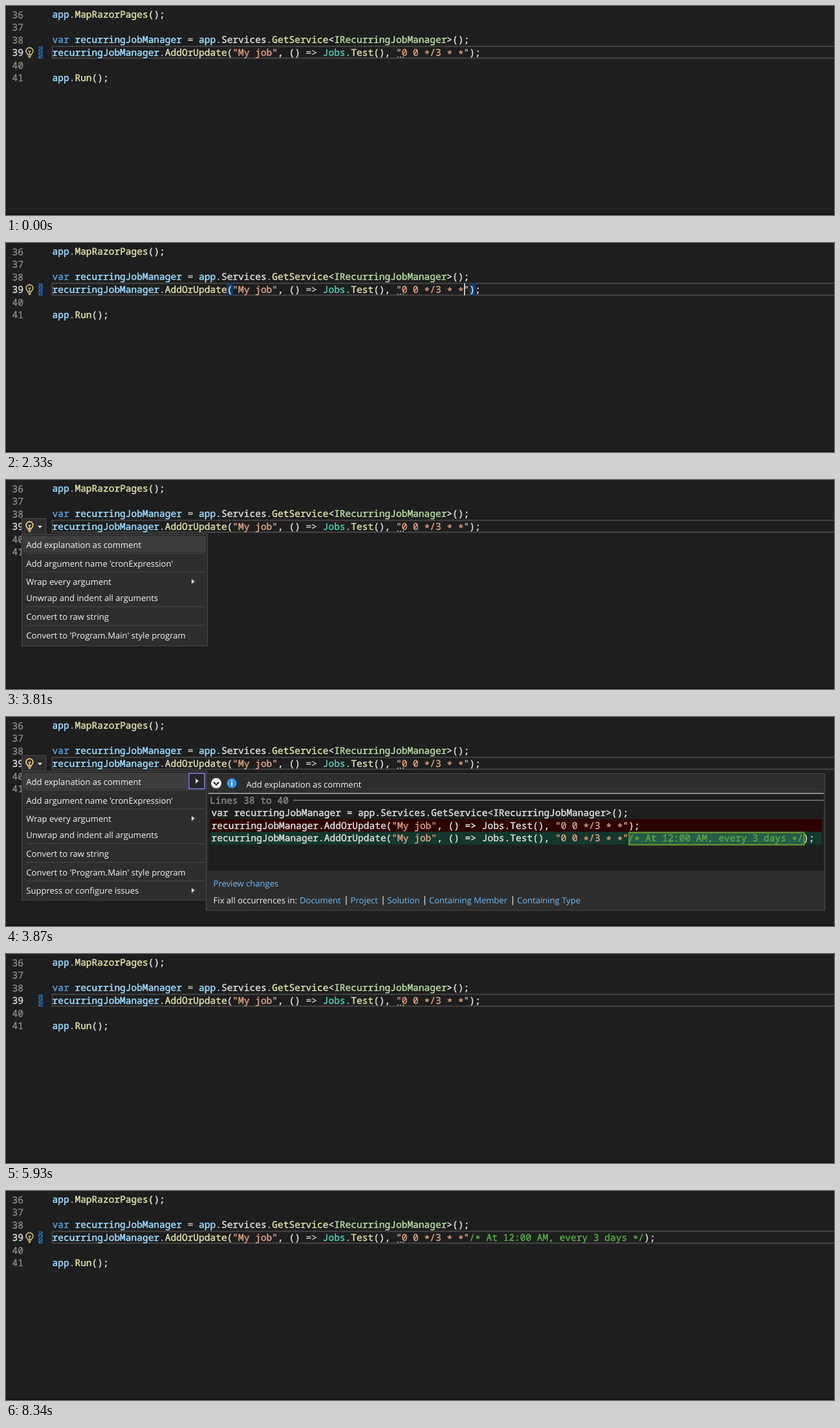
Animation, 1280 px wide and 323 px high, one loop 8.4 s. Source, as an HTML page:

```html
<!DOCTYPE html>
<html lang="en">
<head>
<meta charset="utf-8">
<title>Cron explanation refactoring</title>
<style>
  html, body { margin: 0; width: 100%; height: 100%; overflow: hidden; background: #1e1e1e; }
  svg { display: block; width: 1280px; height: 323px; }
  text { white-space: pre; text-rendering: geometricPrecision; }
  .code { font: 400 14.52px "Noto Sans Mono", "DejaVu Sans Mono", monospace; font-variant-ligatures: none; stroke-width: 0.45px; }
  .ui { font: 400 13.05px "Open Sans", "Noto Sans", sans-serif; }
</style>
</head>
<body>
<svg id="stage" viewBox="0 0 1280 323"></svg>
<script>
const LOOP = 8400;
const PITCH = 8.712;
const LEFT = 71.6;
const COLORS = {
  id: "#9cdcfe", fn: "#dcdcaa", kw: "#569cd6", op: "#b4b4b4", pn: "#dcdcdc",
  itf: "#b8d7a3", cls: "#4ec9b0", str: "#d69d85", com: "#57a64a", num: "#858585", now: "#d8d8d8"
};
const stage = document.getElementById("stage");

function add(parent, tag, attrs, text) {
  const el = document.createElementNS("http://www.w3.org/2000/svg", tag);
  for (const key in attrs) el.setAttribute(key, attrs[key]);
  if (text !== undefined) el.textContent = text;
  parent.appendChild(el);
  return el;
}
const group = (parent = stage) => add(parent, "g", {});
const rect = (parent, x, y, width, height, fill, more) =>
  add(parent, "rect", { x, y, width, height, fill, ...more });
const path = (parent, d, stroke, width = 1, fill = "none") =>
  add(parent, "path", { d, stroke, "stroke-width": width, fill });
const label = (parent, x, y, text, fill = "#f1f1f1") =>
  add(parent, "text", { x, y, fill, class: "ui" }, text);
const colX = col => LEFT + col * PITCH;

// Tokens are [kind, text]; asterisks sit lower, at operator height.
function code(parent, x, y, tokens, plain) {
  const row = add(parent, "text", { x, y, class: "code" });
  let shift = 0;
  for (const [kind, text] of tokens) {
    const tint = COLORS[plain && kind !== "str" && kind !== "com" ? "pn" : kind];
    for (const part of text.split(/(\*)/)) {
      if (!part) continue;
      const want = part === "*" ? 2.6 : 0;
      add(row, "tspan", { fill: tint, stroke: tint, dy: want - shift }, part);
      shift = want;
    }
  }
}

const declare = [
  ["kw", "var "], ["id", "recurringJobManager"], ["op", " = "], ["id", "app"], ["op", "."],
  ["pn", "Services"], ["op", "."], ["fn", "GetService"], ["pn", "<"],
  ["itf", "IRecurringJobManager"], ["pn", ">();"]
];
const call = [
  ["id", "recurringJobManager"], ["op", "."], ["fn", "AddOrUpdate"], ["pn", "("],
  ["str", '"My job"'], ["pn", ", () "], ["op", "=> "], ["cls", "Jobs"], ["op", "."],
  ["fn", "Test"], ["pn", "(), "], ["str", '"0 0 */3 * *"']
];
const note = ["com", "/* At 12:00 AM, every 3 days */"];
const close = ["pn", ");"];
const appCall = name => [["id", "app"], ["op", "."], ["fn", name], ["pn", "();"]];

function dots(parent, x, y) {
  for (let i = 0; i < 3; i++) rect(parent, x + i * 4.1, y, 2, 1.6, "#a5a5a5");
}
function bulb(parent, color) {
  path(parent, "M33.8 75.3C33.5 73.6 31 72.7 31 69.8A5.4 5.4 0 0 1 41.8 69.8C41.8 72.7 39.3 73.6 39 75.3Z", color, 1.7);
  path(parent, "M34 77.5H38.8M34.8 79.6H38M36.4 75V70.5M34.6 69.3L36.4 71L38.2 69.3", color, 1.5);
}
const arrow = (parent, x, y) => path(parent, `M${x} ${y - 3.7}L${x + 4.8} ${y}L${x} ${y + 3.7}Z`, "none", 0, "#e6e6e6");

// Editor
rect(stage, 0, 0, 1280, 323, "#1e1e1e");
rect(stage, 0, 321.5, 1280, 1.5, "#101010");
rect(stage, 71.5, 62.4, 1215, 18.2, "none", { stroke: "#464646", "stroke-width": 1.8 });

const brackets = group();
for (const col of [31, 74]) rect(brackets, colX(col) - 0.3, 62, PITCH + 0.8, 19.6, "#113d6f");

for (let i = 0; i < 6; i++) code(stage, 9.6, 18.9 + i * 19.5, [[i === 3 ? "now" : "num", String(36 + i)]]);
code(stage, LEFT, 18, appCall("MapRazorPages"));
code(stage, LEFT, 57, declare);
code(stage, LEFT, 76.5, call);
code(stage, LEFT, 115.5, appCall("Run"));
dots(stage, 604.8, 78.3);

const tail = group();
code(tail, colX(74), 76.5, [close]);
const notedTail = group();
code(notedTail, colX(74), 76.5, [note, close]);

rect(stage, 51, 63, 5, 17.6, "#1b2b3d", { stroke: "#2468b0", "stroke-width": 1.2 });
path(stage, "M51 69L56 64M51 76L56 68M51 80.5L56 74", "#2f7fd0", 1.2);

const hint = group();
bulb(hint, "#c9b57c");
const caret = rect(stage, 0, 62.3, 1.7, 18.6, "#dcdcdc");

// Quick action menu
const menu = group();
rect(menu, 24.5, 59.5, 37.5, 24, "#2e2e2e", { stroke: "#464646" });
bulb(menu, "#f0cf85");
path(menu, "M49 70.8H56L52.5 74.4Z", "none", 0, "#e6e6e6");

function menuBox(parent, height) {
  rect(parent, 24.5, 83.5, 287, height, "#2e2e2e", { stroke: "#464646" });
}
const shortBox = group(menu), tallBox = group(menu);
menuBox(shortBox, 173);
menuBox(tallBox, 199.5);
rect(menu, 26, 86.5, 283, 25, "#3d3d3d");
const items = [
  [104.6, "Add explanation as comment"],
  [133.5, "Add argument name 'cronExpression'"],
  [162.2, "Wrap every argument"],
  [187.2, "Unwrap and indent all arguments"],
  [215.9, "Convert to raw string"],
  [244.6, "Convert to 'Program.Main' style program"]
];
for (const [y, text] of items) label(menu, 31.3, y, text);
for (const y of [112.8, 141.5, 195.3, 224.2]) rect(menu, 31, y, 277, 1, "#464646");
arrow(menu, 287, 156.8);
rect(tallBox, 31, 253, 277, 1, "#464646");
label(tallBox, 31.3, 273.2, "Suppress or configure issues");
arrow(tallBox, 287, 268);

// Preview panel
const preview = group();
rect(preview, 309.5, 87.5, 956.5, 211.5, "#2e2e2e", { stroke: "#464646" });
rect(preview, 282.8, 87.2, 24, 23.6, "#252526", { stroke: "#7777d8", "stroke-width": 1.5 });
arrow(preview, 293, 99);
rect(preview, 312.5, 118, 951.5, 119.5, "#1e1e1e");
rect(preview, 312.5, 117.4, 951.5, 1.4, "#b8b8b8");
add(preview, "circle", { cx: 325, cy: 102.3, r: 8, fill: "#f4f4f4" });
path(preview, "M320.9 100.7L325 104.6L329.1 100.7", "#222", 2);
add(preview, "circle", { cx: 349, cy: 102.3, r: 7.6, fill: "#3794e8" });
rect(preview, 348.1, 100.9, 1.8, 5.6, "#fff");
rect(preview, 348.1, 97.8, 1.8, 1.9, "#fff");
label(preview, 371.6, 109.2, "Add explanation as comment");
code(preview, 315, 133.6, [["num", "Lines 38 to 40"]]);
rect(preview, 444, 128, 820, 1.2, "#8a8a8a");
rect(preview, 316, 158, 945, 19.5, "#2d0000");
rect(preview, 316, 177.5, 945, 19.5, "#15372d");
rect(preview, 963.3, 178.5, 270.5, 19, "#265d48", { stroke: "#70982f", "stroke-width": 2 });

function diff(plain) {
  const g = group(preview);
  code(g, 317.6, 153.3, declare, plain);
  code(g, 317.6, 172.8, [...call, close], plain);
  code(g, 317.6, 192.3, [...call, note, close], plain);
  return g;
}
const plainDiff = diff(true), tintedDiff = diff(false);
const previewDots = group(preview);
dots(previewDots, 850.8, 174.4);

const LINK = "#6fb7f0";
label(preview, 320.6, 262.3, "Preview changes", LINK);
label(preview, 320.6, 287.5, "Fix all occurrences in:");
const scopes = [[454, "Document"], [532.6, "Project"], [589.5, "Solution"], [654, "Containing Member"], [790, "Containing Type"]];
scopes.forEach(([x, text], i) => {
  label(preview, x, 287.5, text, LINK);
  if (i) rect(preview, x - 7.2, 276.5, 1.2, 14, "#e0e0e0");
});

// Visible spans per layer, in ms
const spans = [
  [brackets, [1800, 2400]],
  [hint, [0, 3810], [7540, LOOP]],
  [tail, [0, 6000]],
  [notedTail, [6000, LOOP]],
  [menu, [3810, 5930]],
  [shortBox, [3810, 3870]],
  [tallBox, [3870, 5930]],
  [preview, [3870, 5930]],
  [plainDiff, [3870, 4470]],
  [tintedDiff, [4470, 5930]],
  [previewDots, [4540, 5930]]
];
// Caret column from each time on; -1 hides it
const caretSteps = [
  [0, -1], [1070, 76], [1600, -1], [1800, 75], [1930, 74], [2330, 73], [2400, 71], [2470, 69],
  [2530, 67], [2670, 66], [2870, 65], [3000, 64], [3130, 63], [3330, 62], [3810, -1],
  [6070, 62], [6550, -1], [7080, 62], [7540, -1], [8070, 62], [8340, -1]
];

const show = (el, on) => el.setAttribute("display", on ? "inline" : "none");
const start = performance.now();

function draw(now) {
  const t = Math.max(0, now - start) % LOOP;
  for (const [el, ...times] of spans) show(el, times.some(([a, b]) => t >= a && t < b));
  let col = -1;
  for (const [at, c] of caretSteps) if (t >= at) col = c;
  show(caret, col >= 0);
  if (col >= 0) caret.setAttribute("x", colX(col) + 0.4);
  requestAnimationFrame(draw);
}
draw(start);
</script>
</body>
</html>
```
